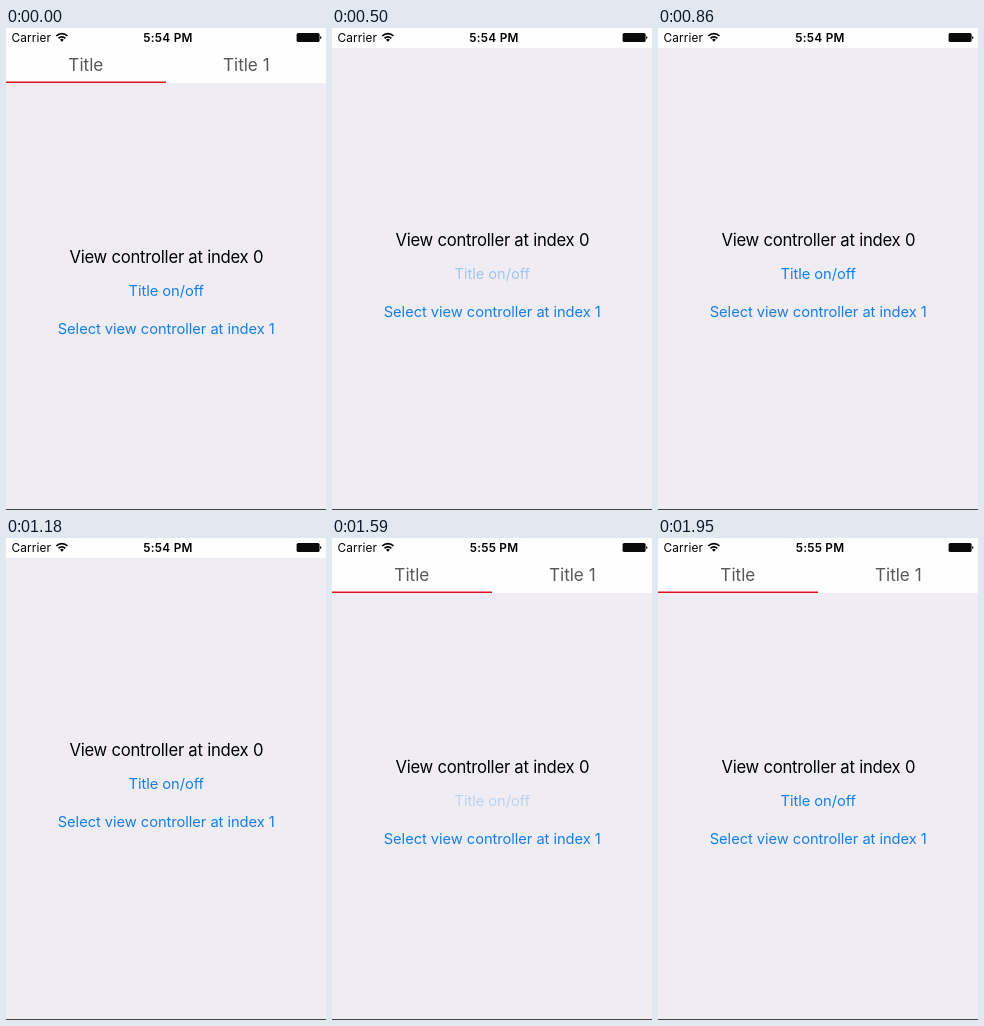
Recreate the animation shown at these times as an HTML page. Size 320 by 482 pixels, loop 1.99 s.

```html
<!DOCTYPE html>
<html lang="en">
<head>
<meta charset="utf-8">
<title>Title toggle</title>
<style>
  html, body { margin: 0; width: 100%; height: 100%; overflow: hidden; background: #efedf3; }
  svg { display: block; width: 320px; height: 482px; }
  text { font-family: Inter, Roboto, sans-serif; text-anchor: middle; }
  .status { font-size: 11.8px; letter-spacing: .15px; }
  .clock { font-weight: 600; letter-spacing: .25px; }
  .tab { font-size: 17.1px; fill: #58585a; }
  .label { font-size: 16.7px; letter-spacing: -.25px; }
  .link { font-size: 14.7px; letter-spacing: -.05px; fill: #147fea; }
</style>
</head>
<body>
<svg viewBox="0 0 320 482">
  <rect width="320" height="482" fill="#efedf3"/>
  <rect width="320" height="20" fill="#fefefe"/>

  <g class="status">
    <text x="5.5" y="13.7" style="text-anchor: start">Carrier</text>
    <text id="clock" class="clock" x="162" y="13.7">5:54 PM</text>
  </g>
  <g fill="none" stroke="#000" stroke-width="1.7">
    <path d="M50.3 8a7.8 7.8 0 0 1 11.2 0M52.5 10.3a4.8 4.8 0 0 1 6.8 0"/>
    <path d="M55.9 13.7l-1.9-2a2.7 2.7 0 0 1 3.8 0z" fill="#000" stroke="none"/>
  </g>
  <rect x="290.6" y="5" width="23" height="9" rx="1.6" fill="#0a0a0a"/>
  <path d="M314.1 7.9v3.2q1.3-.5 1.3-1.6t-1.3-1.6z"/>

  <g id="tabs">
    <rect y="20" width="320" height="35" fill="#fefefe"/>
    <rect y="53.5" width="160" height="1.5" fill="#d81420"/>
    <text class="tab" x="79.8" y="42.8">Title</text>
    <text class="tab" x="240.3" y="42.8">Title 1</text>
  </g>

  <g id="content">
    <text class="label" x="160.3" y="235">View controller at index 0</text>
    <text id="toggle" class="link" x="160.2" y="268">Title on/off</text>
    <text class="link" x="160.2" y="306.2">Select view controller at index 1</text>
  </g>
  <rect y="481" width="320" height="1" fill="#444"/>
</svg>
<script>
  const LOOP = 1990, HIDE = 410, SHOW = 1550, HOLD = 270, FADE = 320;
  const $ = id => document.getElementById(id);

  // A tap dims the button at once; on release it eases back.
  function tapAlpha(t, release) {
    if (t < release - HOLD) return 1;
    const u = Math.min(Math.max((t - release) / FADE, 0), 1);
    return .2 + .8 * u * u * (3 - 2 * u);
  }

  function draw(now) {
    const t = now % LOOP;
    const hidden = t >= HIDE && t < SHOW;
    $('tabs').setAttribute('visibility', hidden ? 'hidden' : 'visible');
    $('content').setAttribute('transform', `translate(0 ${hidden ? -17.5 : 0})`);
    $('toggle').setAttribute('opacity', Math.min(tapAlpha(t, HIDE), tapAlpha(t, SHOW)));
    $('clock').textContent = t < 1400 ? '5:54 PM' : '5:55 PM';
  }

  const start = performance.now();
  function tick() {
    draw(performance.now() - start);
    requestAnimationFrame(tick);
  }
  tick();
</script>
</body>
</html>
```
